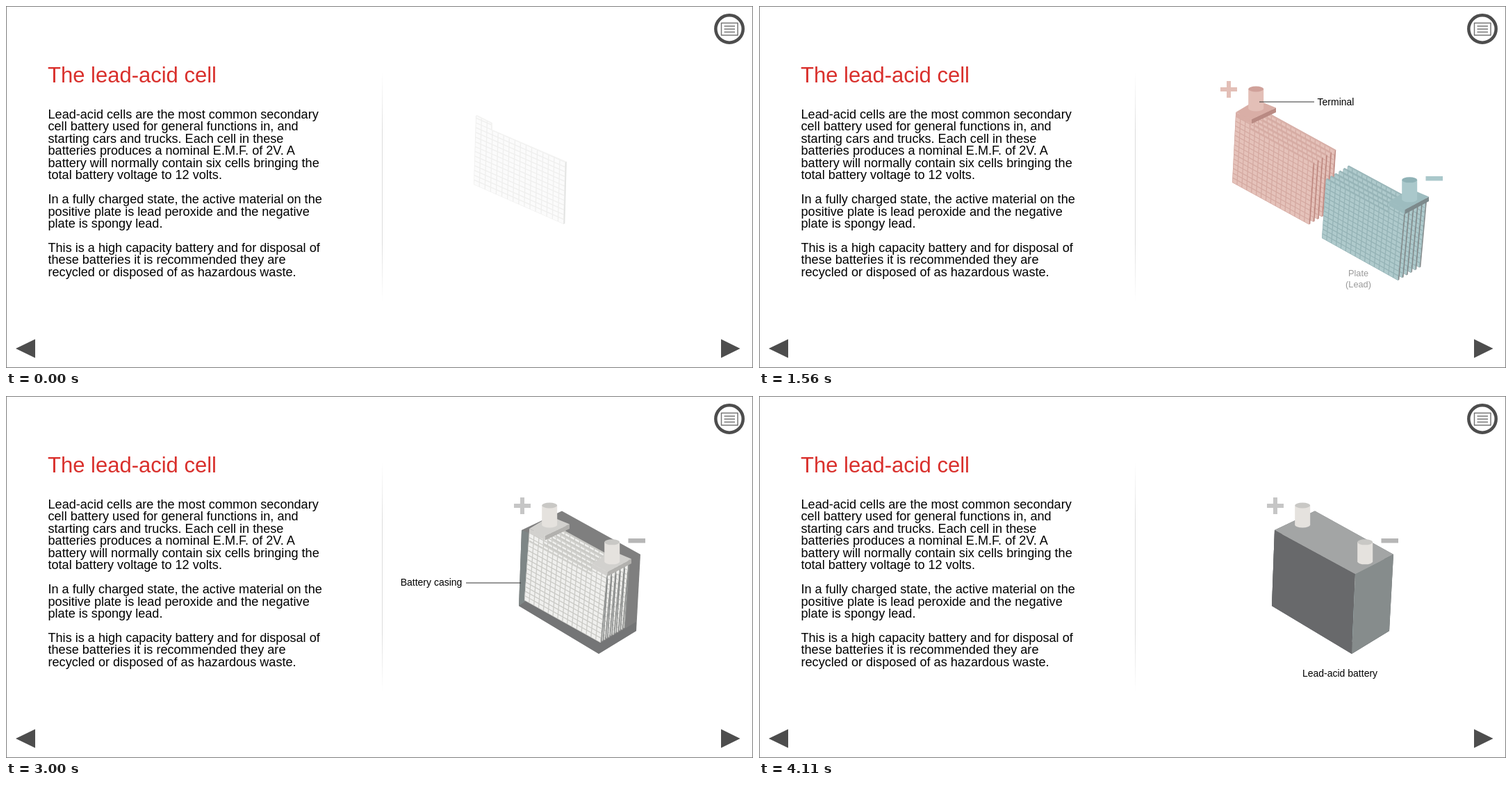
An HTML page with a canvas that plays this animation: 1075 px wide and 521 px high, repeating every 4.61 s.

```html
<!DOCTYPE html>
<html lang="en">
<head>
<meta charset="utf-8">
<title>The lead-acid cell</title>
<style>
html, body { margin: 0; width: 100%; height: 100%; overflow: hidden; background: #fff; }
body { position: relative; font-family: "Liberation Sans", Arial, sans-serif; }
h1, pre, svg, canvas { position: absolute; margin: 0; font-weight: normal; font-family: inherit; white-space: pre; }
svg, canvas { left: 0; top: 0; }
h1 { left: 60px; top: 84px; font-size: 31px; line-height: 31px; color: #d9302c; }
pre { left: 60.5px; top: 148px; font-size: 18.1px; line-height: 17.45px; color: #000; }
</style>
</head>
<body>
<svg width="1075" height="521">
  <defs>
    <linearGradient id="fade" x1="0" y1="0" x2="0" y2="1">
      <stop offset="0" stop-color="#ddd" stop-opacity="0"/>
      <stop offset=".25" stop-color="#ddd"/>
      <stop offset=".75" stop-color="#ddd"/>
      <stop offset="1" stop-color="#ddd" stop-opacity="0"/>
    </linearGradient>
  </defs>
  <rect x=".5" y=".5" width="1074" height="520" fill="none" stroke="#7f7f7f"/>
  <rect x="541" y="95" width="1" height="330" fill="url(#fade)"/>
  <path d="M14 493L42 479.500V506.500ZM1056.500 493L1029 479.500V506.500Z" fill="#4d4d4d"/>
  <circle cx="1041" cy="33" r="19.700" fill="none" stroke="#4d4d4d" stroke-width="4.500"/>
  <path d="M1029.500 24.500h23.500v17.500h-23.500ZM1033.500 29h15.500M1033.500 33.200h15.500M1033.500 37.400h15.500" fill="none" stroke="#777" stroke-width="1.500"/>
</svg>
<h1>The lead-acid cell</h1>
<pre>Lead-acid cells are the most common secondary
cell battery used for general functions in, and
starting cars and trucks. Each cell in these
batteries produces a nominal E.M.F. of 2V. A
battery will normally contain six cells bringing the
total battery voltage to 12 volts.

In a fully charged state, the active material on the
positive plate is lead peroxide and the negative
plate is spongy lead.

This is a high capacity battery and for disposal of
these batteries it is recommended they are
recycled or disposed of as hazardous waste.</pre>
<canvas id="stage" width="1075" height="521"></canvas>
<script>
const LOOP = 4610, STEP = 30, COLS = 16, ROWS = 13;
const ctx = document.getElementById('stage').getContext('2d');

const ramp = (t, a, b) => Math.min(1, Math.max(0, (t - a) / (b - a)));
const lerp = (a, b, k) => a + (b - a) * k;
const between = (p, q, k) => [lerp(p[0], q[0], k), lerp(p[1], q[1], k)];
const channels = hex => [1, 3, 5].map(i => parseInt(hex.slice(i, i + 2), 16));

function mix(from, to, k) {
  const end = channels(to);
  return `rgb(${channels(from).map((c, i) => Math.round(lerp(c, end[i], k)))})`;
}

const GREY = { face: '#f0f0ee', line: '#cacac6', edge: '#8c8e8d', deck: '#d2d1ce', side: '#b2b1ae', body: '#e5e2de', cap: '#c9c8c5', sign: '#c6c6c6' };
const PINK = { face: '#e5c2ba', line: '#d5aaa2', edge: '#bd877f', deck: '#d9aea6', side: '#b98a83', body: '#e3bfb7', cap: '#d0a19a', sign: '#e3bfb7' };
const BLUE = { face: '#afcacc', line: '#95b3b6', edge: '#83898a', deck: '#9dbcbf', side: '#7d8a8c', body: '#aac8cb', cap: '#8fb2b6', sign: '#aac8cb' };
const tinted = (pal, k) => Object.fromEntries(Object.keys(pal).map(key => [key, mix(GREY[key], pal[key], k)]));

// Outline runs clockwise from bottom left; top holds the grid's upper corners.
const WIDE = {
  outline: [[673, 257], [676, 158], [698, 169], [698, 179], [805, 225], [802.5, 314]],
  top: [[676, 168], [805, 225]]
};
const POSITIVE = {
  outline: [[681, 254], [686, 156], [706, 166], [705.5, 176], [797.5, 226.5], [791.5, 314.5]],
  top: [[685.5, 165.5], [797.5, 226.5]]
};
const NEGATIVE = {
  outline: [[810, 334], [816, 249], [907, 298], [908, 286], [928.5, 297], [919.5, 395]],
  top: [[816, 249], [927.5, 309]]
};

function trace(points) {
  ctx.beginPath();
  points.forEach(p => ctx.lineTo(...p));
  ctx.closePath();
}
function fill(points, color) {
  trace(points);
  ctx.fillStyle = color;
  ctx.fill();
}
function group(dx, dy, alpha, draw) {
  if (alpha <= 0) return;
  ctx.save();
  ctx.translate(dx, dy);
  ctx.globalAlpha = alpha;
  draw();
  ctx.restore();
}

function plate({ outline, top }, pal) {
  const shift = ([x, y]) => [x + 1.8, y - 1.1];
  for (let i = 1; i < 5; i++) {
    const [a, b] = outline.slice(i, i + 2);
    fill([a, shift(a), shift(b), b], i < 4 ? pal.line : pal.edge);
  }
  fill(outline, pal.face);
  ctx.save();
  ctx.clip();
  const bl = outline[0], br = outline[5];
  ctx.beginPath();
  for (let i = 0; i <= COLS; i++) {
    const foot = between(bl, br, i / COLS);
    ctx.moveTo(...foot);
    ctx.lineTo(...between(foot, between(...top, i / COLS), 1.2));
  }
  for (let j = 0; j <= ROWS + 2; j++) {
    ctx.moveTo(...between(bl, top[0], j / ROWS));
    ctx.lineTo(...between(br, top[1], j / ROWS));
  }
  ctx.strokeStyle = pal.line;
  ctx.lineWidth = 1.3;
  ctx.stroke();
  ctx.restore();
}

function connector([left, back, right, front], pal) {
  const drop = ([x, y]) => [x, y + 6.5];
  fill([left, front, drop(front), drop(left)], pal.deck);
  fill([front, right, drop(right), drop(front)], pal.side);
  fill([left, back, right, front], pal.deck);
}

function terminal(x, y, pal) {
  ctx.fillStyle = pal.body;
  ctx.beginPath();
  ctx.ellipse(x, y + 28, 11, 4, 0, 0, Math.PI);
  ctx.lineTo(x - 11, y);
  ctx.lineTo(x + 11, y);
  ctx.fill();
  ctx.fillStyle = pal.cap;
  ctx.beginPath();
  ctx.ellipse(x, y, 11, 4, 0, 0, 7);
  ctx.fill();
}

const CASE = {
  left: [742, 193], back: [800, 165.5], right: [913, 228], front: [858, 256],
  lowLeft: [738, 302], lowRight: [907, 338], lowFront: [853, 371]
};

function casing(acid) {
  const c = CASE;
  fill([c.left, c.back, c.right, c.lowRight, c.lowFront, c.lowLeft], mix('#7f7f7f', '#696b6d', acid));
  fill([c.lowLeft, [748, 295], [858, 354], [907, 325], c.lowRight, c.lowFront], mix('#747576', '#626466', acid));
  fill([c.left, [752, 197], [748, 295], c.lowLeft], mix('#7e8686', '#6c7071', acid));
}

function acidBody() {
  const left = [748, 207], front = [857, 274], right = [909, 244], low = [855, 353];
  fill([left, [795, 180], right, front], 'rgba(225,228,228,.35)');
  fill([left, front, low, [746, 294]], 'rgba(172,216,222,.72)');
  fill([front, right, [904, 325], low], 'rgba(190,200,202,.5)');
}

function cover() {
  const c = CASE;
  fill([c.left, c.back, c.right, c.front], '#a3a5a5');
  fill([c.left, c.front, c.lowFront, c.lowLeft], '#68696b');
  fill([c.front, c.right, c.lowRight, c.lowFront], '#868c8c');
}

// Leader runs from the text to the part.
const LABELS = [
  { text: ['Plate', '(Lead oxide)'], at: [740.5, 363], from: 240, to: 1080, leader: [[740, 336], [740, 257]] },
  { text: ['Terminal'], at: [830, 138], from: 1230, to: 1650, leader: [[799, 138], [720, 138]] },
  { text: ['Plate', '(Lead)'], at: [862.5, 392.5], from: 1488, to: 2160, leader: [[862, 373], [862, 300]] },
  { text: ['Battery casing'], at: [612, 268], from: 2730, to: 3240, leader: [[662, 269], [741, 269]] },
  { text: ['Sulfuric acid'], at: [1005.5, 309], from: 3160, to: 3600, leader: [[962, 309], [883, 309]] },
  { text: ['Lead-acid battery'], at: [836, 399], from: 3900, to: LOOP }
];

function label({ text, at, from, to, leader }, t) {
  const shown = ramp(t, from, from + 180), reach = ramp(t, from + 180, from + 260);
  const alpha = shown * (1 - ramp(t, to, to + 120));
  group(0, 0, alpha, () => {
    if (leader && reach) {
      ctx.beginPath();
      ctx.moveTo(...leader[0]);
      ctx.lineTo(...between(...leader, reach));
      ctx.strokeStyle = '#333';
      ctx.lineWidth = 1.2;
      ctx.stroke();
    }
    const size = .85 + .15 * shown;
    ctx.translate(...at);
    ctx.scale(size, size);
    ctx.font = '14px "Liberation Sans", Arial, sans-serif';
    ctx.textAlign = 'center';
    ctx.fillStyle = '#000';
    text.forEach((line, i) => ctx.fillText(line, 0, 5 + 18 * (i - (text.length - 1) / 2)));
  });
}

function draw(t) {
  ctx.clearRect(0, 0, 1075, 521);
  const tint = ramp(t, 660, 900) * (1 - ramp(t, 2730, 2910));
  const pink = tinted(PINK, tint), blue = tinted(BLUE, t < 2700 ? 1 : tint);
  const move = ramp(t, 2220, 2700);
  const posAt = [67 * move, 38 * move], negAt = [-64 * move, -40 * move];
  const negAlpha = ramp(t, 750, 960), signAlpha = ramp(t, 840, 1050);
  const topAlpha = ramp(t, 1110, 1380), acid = ramp(t, 3240, 3450);

  group(0, 0, ramp(t, 2730, 2910), () => casing(acid));

  if (t < 570) {
    group(0, 0, .25 + .75 * ramp(t, 0, 240), () => plate(WIDE, tinted(PINK, 0)));
  } else {
    const count = Math.min(6, 3 + Math.floor((t - 570) / STEP));
    for (let i = 5; i >= 0; i--) {
      const dx = 6.2 * i, dy = -3.7 * i;
      if (i < count) group(posAt[0] + dx, posAt[1] + dy, 1, () => plate(POSITIVE, pink));
      group(negAt[0] + dx, negAt[1] + dy, negAlpha, () => plate(NEGATIVE, blue));
    }
  }

  group(0, 0, acid, acidBody);
  group(...posAt, topAlpha, () => connector([[686, 153], [716, 135], [744, 146.5], [709, 163]], pink));
  group(...negAt, topAlpha, () => connector([[907, 281], [937, 263], [964, 274.5], [929.5, 293]], blue));
  group(0, 0, ramp(t, 3600, 3930), cover);
  group(...posAt, topAlpha, () => terminal(715.2, 119.5, pink));
  group(...negAt, topAlpha, () => terminal(936.2, 250.3, blue));

  group(...posAt, signAlpha, () => {
    ctx.fillStyle = pink.sign;
    ctx.fillRect(664, 117, 24, 6);
    ctx.fillRect(673, 108, 6, 24);
  });
  group(...negAt, signAlpha, () => {
    ctx.fillStyle = t < 2700 ? blue.sign : mix('#b6b6b6', BLUE.sign, tint);
    ctx.fillRect(959.5, 245, 24.5, 6.5);
  });

  LABELS.forEach(item => label(item, t));
}

const start = performance.now();
function tick() {
  const t = (performance.now() - start) % LOOP;
  draw(Math.floor(t / STEP) * STEP);
  requestAnimationFrame(tick);
}
tick();
</script>
</body>
</html>
```
